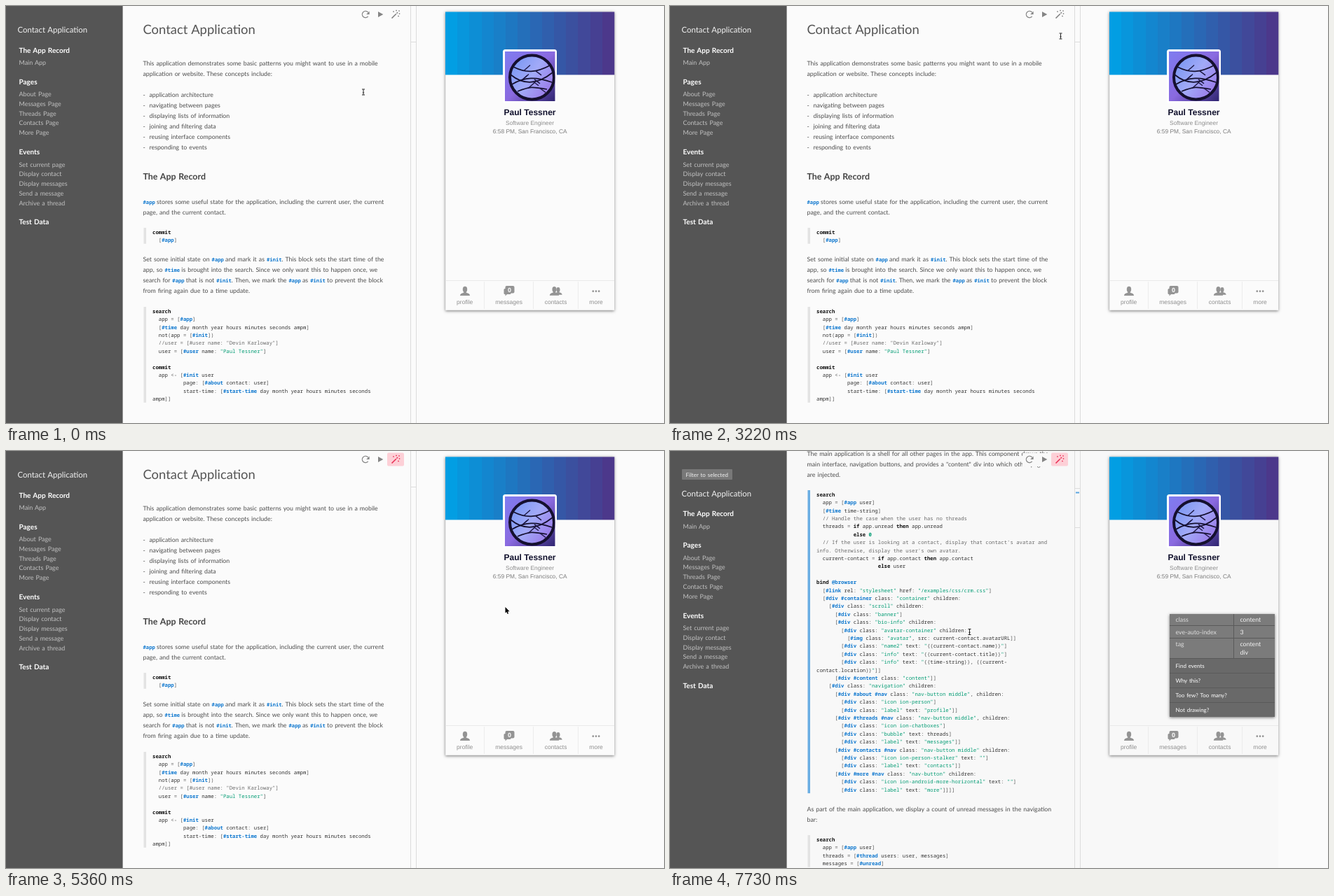
Recreate the animation shown at these times as an HTML page with a canvas. Size 939 by 596 pixels, loop 8000 ms.

```html
<!DOCTYPE html>
<html lang="en">
<head>
<meta charset="utf-8">
<title>Contact Application</title>
<style>
  html, body { margin: 0; width: 100%; height: 100%; overflow: hidden; background: #fbfbfb; }
  canvas { display: block; }
</style>
</head>
<body>
<canvas id="stage" width="939" height="596"></canvas>
<script>
const ctx = document.getElementById('stage').getContext('2d');
const LOOP = 8000;
const SANS = 'Lato, "Open Sans", sans-serif';
const MONO = '"Noto Sans Mono", "DejaVu Sans Mono", monospace';
const ARIAL = '"Liberation Sans", Arial, sans-serif';
const CODE_SIZE = 7.32, CODE_STEP = 11.4, BODY_SIZE = 8.78;
const BLUE = '#0f78cf', GREEN = '#039c74', GRAY = '#949494';
const KEYWORDS = new Set(['search', 'commit', 'bind', 'if', 'then', 'else']);

// Pointer poses, each held until the next: time, x, y, shape
const POSES = [
  [0, 510, 123, 'beam'], [840, 510, 124, 'beam'], [1000, 511, 127, 'beam'], [1160, 515, 133, 'beam'],
  [1320, 847, 287, 'arrow'], [1480, 796.5, 284.5, 'arrow'], [1630, 794, 288, 'arrow'], [1780, 793, 291, 'arrow'],
  [1980, 793, 295, 'arrow'], [2130, 792, 298, 'arrow'], [2270, 788, 296, 'arrow'], [2420, 775, 289, 'arrow'],
  [2570, 752, 278, 'arrow'], [2720, 723, 265, 'arrow'], [2860, 695, 241, 'arrow'],
  [3070, 562, 61, 'beam'], [3220, 557.5, 43, 'beam'], [3370, 557, 36, 'beam'], [3520, 557, 29, 'beam'],
  [3660, 558, 23, 'hand'], [3810, 558, 21.5, 'hand'], [4110, 558, 21.5, 'hand'],
  [4270, 582, 46, 'arrow'], [4430, 640, 130, 'arrow'], [4600, 698, 204, 'arrow'], [4760, 712.5, 223, 'arrow'],
  [5600, 713, 252, 'arrow'], [6040, 713.5, 253, 'arrow'],
  [7230, 668, 256, 'arrow'], [7400, 560, 252, 'beam'], [7560, 478, 253, 'beam'], [7730, 427.5, 258.5, 'beam']
];
const CLOCK_AT = 2420, HOVER_AT = 3660, ACTIVE_AT = 4110, INSPECT_AT = 5600;

const INTRO = [
  [81.5, 'This application demonstrates some basic patterns you might want to use in a mobile'],
  [96.5, 'application or website. These concepts include:'],
  [279.5, '|#app| stores some useful state for the application, including the current user, the current'],
  [294.5, 'page, and the current contact.'],
  [362, 'Set some initial state on |#app| and mark it as |#init|. This block sets the start time of the'],
  [377, 'app, so |#time| is brought into the search. Since we only want this to happen once, we'],
  [392, 'search for |#app| that is not |#init|. Then, we mark the |#app| as |#init| to prevent the block'],
  [407, 'from firing again due to a time update.']
];
const BULLETS = ['application architecture', 'navigating between pages', 'displaying lists of information',
  'joining and filtering data', 'reusing interface components', 'responding to events'];
const SHELL = [
  [3.5, 'The main application is a shell for all other pages in the app. This component draws the'],
  [18.5, 'main interface, navigation buttons, and provides a "content" div into which other pages'],
  [33.5, 'are injected.'],
  [511.5, 'As part of the main application, we display a count of unread messages in the navigation'],
  [526.5, 'bar:']
];
const SIDEBAR = [
  [63, 'The App Record', ['Main App']],
  [108, 'Pages', ['About Page', 'Messages Page', 'Threads Page', 'Contacts Page', 'More Page']],
  [208.5, 'Events', ['Set current page', 'Display contact', 'Display messages', 'Send a message', 'Archive a thread']],
  [308.5, 'Test Data', []]
];

// A leading ~ marks a wrapped comment line
const COMMIT_CODE = `commit
  [#app]`;
const INIT_CODE = `search
  app = [#app]
  [#time day month year hours minutes seconds ampm]
  not(app = [#init])
  //user = [#user name: "Devin Karloway"]
  user = [#user name: "Paul Tessner"]

commit
  app <- [#init user
          page: [#about contact: user]
          start-time: [#start-time day month year hours minutes seconds
ampm]]`;
const SHELL_CODE = `search
  app = [#app user]
  [#time time-string]
  // Handle the case when the user has no threads
  threads = if app.unread then app.unread
            else 0
  // If the user is looking at a contact, display that contact's avatar and
~info. Otherwise, display the user's own avatar.
  current-contact = if app.contact then app.contact
                    else user

bind @browser
  [#link rel: "stylesheet" href: "/examples/css/crm.css"]
  [#div #container class: "container" children:
    [#div class: "scroll" children:
      [#div class: "banner"]
      [#div class: "bio-info" children:
        [#div class: "avatar-container" children:
          [#img class: "avatar", src: current-contact.avatarURL]]
        [#div class: "name2" text: "{{current-contact.name}}"]
        [#div class: "info" text: "{{current-contact.title}}"]
        [#div class: "info" text: "{{time-string}}, {{current-
contact.location}}"]]
      [#div #content class: "content"]]
    [#div class: "navigation" children:
      [#div #about #nav class: "nav-button middle", children:
        [#div class: "icon ion-person"]
        [#div class: "label" text: "profile"]]
      [#div #threads #nav class: "nav-button middle", children:
        [#div class: "icon ion-chatboxes"]
        [#div class: "bubble" text: threads]
        [#div class: "label" text: "messages"]]
      [#div #contacts #nav class: "nav-button middle" children:
        [#div class: "icon ion-person-stalker" text: ""]
        [#div class: "label" text: "contacts"]]
      [#div #more #nav class: "nav-button" children:
        [#div class: "icon ion-android-more-horizontal" text: ""]
        [#div class: "label" text: "more"]]]]`;
const COUNT_CODE = `search
  app = [#app user]
  threads = [#thread users: user, messages]
  messages = [#unread]`;

function rect(x, y, w, h, fill) {
  ctx.fillStyle = fill;
  ctx.fillRect(x, y, w, h);
}

function round(x, y, w, h, r, fill) {
  ctx.fillStyle = fill;
  ctx.beginPath();
  ctx.roundRect(x, y, w, h, r);
  ctx.fill();
}

function shadowed(blur, color, paint) {
  ctx.save();
  ctx.shadowColor = color;
  ctx.shadowBlur = blur;
  ctx.shadowOffsetY = 1;
  paint();
  ctx.restore();
}

function poly(points, fill, stroke, width = 1) {
  ctx.beginPath();
  points.forEach(([x, y]) => ctx.lineTo(x, y));
  ctx.closePath();
  if (stroke) {
    ctx.strokeStyle = stroke;
    ctx.lineWidth = width;
    ctx.stroke();
  }
  ctx.fillStyle = fill;
  ctx.fill();
}

function line(x1, y1, x2, y2, color, width = 1) {
  ctx.strokeStyle = color;
  ctx.lineWidth = width;
  ctx.beginPath();
  ctx.moveTo(x1, y1);
  ctx.lineTo(x2, y2);
  ctx.stroke();
}

function text(str, x, y, font, color, align = 'left') {
  ctx.font = font;
  ctx.textAlign = align;
  ctx.wordSpacing = font.includes('Lato') ? '0.8px' : '0px';
  ctx.fillStyle = color;
  ctx.fillText(str, x, y);
  return ctx.measureText(str).width;
}

const sans = (size, weight = 400) => `${weight} ${size}px ${SANS}`;
const mono = (weight = 400, size = CODE_SIZE) => `${weight} ${size}px ${MONO}`;
const arial = (size, weight = 400) => `${weight} ${size}px ${ARIAL}`;

// Text between bars is set as an inline tag
function prose(lines) {
  for (const [y, str] of lines) {
    let x = 195.5;
    str.split('|').forEach((run, i) => {
      x += i % 2 ? text(run, x, y + 3, mono(700, 7.2), BLUE) : text(run, x, y + 3, sans(BODY_SIZE), '#4c4c4c');
    });
  }
}

function tokenStyle(token) {
  if (token.startsWith('//')) return [400, '#6c6c6c'];
  if (/^[#@]/.test(token)) return [700, BLUE];
  if (KEYWORDS.has(token)) return [700, '#111'];
  if (/^("|\d+$)/.test(token)) return [token === '0' ? 700 : 500, GREEN];
  return [400, /^[\w.-]+$/.test(token) ? '#333' : '#5c5c5c'];
}

function code(source, y, bar) {
  const lines = source.split('\n');
  rect(196.5, y - 6, 3.5, lines.length * CODE_STEP, bar);
  ctx.font = mono();
  const advance = ctx.measureText('0').width;
  lines.forEach((str, row) => {
    const base = y + 2.8 + row * CODE_STEP;
    if (str[0] === '~') {
      text(str.slice(1), 209, base, mono(), '#6c6c6c');
      return;
    }
    for (const match of str.matchAll(/\/\/.*|"[^"{]*"|"|[#@][\w-]+|[\w.-]+|[^\s\w"#@\/]+/g)) {
      const [weight, color] = tokenStyle(match[0]);
      text(match[0], 209 + match.index * advance, base, mono(weight), color);
    }
  });
}

function sidebar(inspect) {
  const dy = inspect ? 26.5 : 0;
  rect(0, 0, 166.6, 596, '#555');
  if (inspect) {
    round(17, 26, 72, 15, 1, '#787878');
    text('Filter to selected', 22.5, 36.5, sans(8), '#f0f0f0');
  }
  text('Contact Application', 16.5, 38 + dy, sans(11.4), '#f2f2f2');
  for (const [y, head, items] of SIDEBAR) {
    text(head, 18.5, y + 3.5 + dy, sans(10, 700), '#fff');
    items.forEach((item, i) => text(item, 18.5, y + 21 + i * 13.8 + dy, sans(8.95), '#c2c2c2'));
  }
}

function editor(inspect) {
  if (inspect) {
    rect(166, 0, 702, 596, '#f8f8f8');
    prose(SHELL);
    code(SHELL_CODE, 62, '#6aaee3');
    code(COUNT_CODE, 555, '#e3e3e3');
    return;
  }
  text('Contact Application', 195.5, 40, sans(18.4), '#555');
  text('The App Record', 195.5, 247.5, sans(12.4, 700), '#444');
  prose(INTRO);
  BULLETS.forEach((item, i) => {
    text('-', 195.5, 129.5 + i * 15, sans(BODY_SIZE), '#4c4c4c');
    text(item, 204.5, 129.5 + i * 15, sans(BODY_SIZE), '#4c4c4c');
  });
  code(COMMIT_CODE, 323, '#e3e3e3');
  code(INIT_CODE, 436, '#e3e3e3');
}

function divider(inspect) {
  line(577.5, 0, 577.5, 596, '#dcdcdc');
  line(585.5, 0, 585.5, 596, '#dcdcdc');
  for (const y of inspect ? [53.5, 109.5] : [51.5]) line(578, y, 585, y, '#dcdcdc');
  if (inspect) line(579, 59.5, 584, 59.5, '#5aa5e0', 2);
}

function toolbar(hover, active, inspect) {
  rect(503, 3, 65, 19, inspect ? '#f8f8f8' : '#fbfbfb');
  if (hover || active) round(544, 2.5, 24, 19, 2, active ? '#fdd0d7' : '#e9e9e9');

  ctx.strokeStyle = '#858585';
  ctx.lineWidth = 1.3;
  ctx.beginPath();
  ctx.arc(513, 12, 4.6, 0.65, 5.6);
  ctx.stroke();
  poly([[518.6, 7.6], [518.6, 12], [514.2, 12]], '#858585');
  poly([[531, 8], [538.3, 12], [531, 16]], '#858585');

  const wand = active ? '#ea2f55' : '#808080';
  line(550.5, 17.5, 556.8, 11.2, wand, 1.6);
  line(557.5, 10.5, 559, 9, wand, 1.6);
  for (const [x, y] of [[553, 8], [557, 6.5], [561, 7], [561.5, 11], [560, 14.5]]) {
    line(x - 1, y, x + 1, y, wand, 0.7);
    line(x, y - 1, x, y + 1, wand, 0.7);
  }
}

function banner() {
  const from = [2, 158, 227], to = [76, 56, 139], bands = 14;
  const edge = i => i === bands ? 868.3 : Math.round(627 + i * 241 / bands);
  for (let i = 0; i < bands; i++) {
    const k = i / (bands - 1);
    const rgb = from.map((c, n) => Math.round(c + (to[n] - c) * k));
    rect(edge(i), 8.4, edge(i + 1) - edge(i), 90, `rgb(${rgb})`);
  }
}

function avatar() {
  round(709, 62, 77, 77, 3.5, '#fff');
  ctx.save();
  ctx.beginPath();
  ctx.rect(712, 65, 71.5, 71);
  ctx.clip();
  const back = ctx.createLinearGradient(712, 65, 784, 136);
  back.addColorStop(0, '#7f7cf0');
  back.addColorStop(0.5, '#8a6ae0');
  back.addColorStop(1, '#2f2470');
  rect(712, 65, 72, 71, back);
  const glass = ctx.createLinearGradient(720, 80, 780, 120);
  glass.addColorStop(0, '#7796f2');
  glass.addColorStop(0.5, '#a2aaf8');
  glass.addColorStop(1, '#9a78e8');
  ctx.fillStyle = glass;
  ctx.strokeStyle = '#15102f';
  ctx.lineWidth = 4;
  ctx.beginPath();
  ctx.arc(750.5, 102, 31.5, 0, 7);
  ctx.fill();
  ctx.stroke();
  ctx.lineWidth = 1.7;
  for (const [x, y, bend, end] of [[724, 87, 9, 778], [720, 98, 15, 780], [722, 112, -11, 779], [730, 122, -7, 772]]) {
    ctx.beginPath();
    ctx.moveTo(x, y);
    ctx.bezierCurveTo(x + 18, y + bend, end - 22, y + bend, end, y - 3);
    ctx.stroke();
    line(x + 15, y + bend * 0.6, x + 24, y + bend * 0.6 - 8, '#1b1540', 1.4);
    line(x + 32, y + bend * 0.65, x + 40, y + bend * 0.65 + 6, '#1b1540', 1.4);
    ctx.strokeStyle = '#15102f';
    ctx.lineWidth = 1.7;
  }
  ctx.restore();
}

function person(x, y, s) {
  ctx.fillStyle = GRAY;
  ctx.beginPath();
  ctx.ellipse(x, y - 2.6 * s, 3.2 * s, 4.2 * s, 0, 0, 7);
  ctx.fill();
  ctx.beginPath();
  ctx.moveTo(x - 7 * s, y + 6.5 * s);
  ctx.quadraticCurveTo(x - 7 * s, y + 3.3 * s, x - 1.8 * s, y + 2.2 * s);
  ctx.lineTo(x - 1.8 * s, y);
  ctx.lineTo(x + 1.8 * s, y);
  ctx.lineTo(x + 1.8 * s, y + 2.2 * s);
  ctx.quadraticCurveTo(x + 7 * s, y + 3.3 * s, x + 7 * s, y + 6.5 * s);
  ctx.fill();
}

function navigation() {
  line(628, 392.5, 868, 392.5, '#e9e9e9');
  for (const x of [682.5, 752.5, 816.5]) line(x, 394, x, 433, '#ececec');
  person(655, 407.5, 1);
  round(710.5, 404, 10, 8, 1.5, GRAY);
  poly([[712.5, 411], [712.5, 414.5], [716, 411]], GRAY);
  round(712.5, 400, 13, 10.5, 2, GRAY);
  text('0', 718.5, 408.7, arial(9, 700), '#fff', 'center');
  person(788, 407.5, 0.8);
  person(782.5, 407.5, 0.95);
  ctx.fillStyle = GRAY;
  for (const x of [837.8, 842, 846.2]) {
    ctx.beginPath();
    ctx.arc(x, 407.7, 1.35, 0, 7);
    ctx.fill();
  }
  [['profile', 654.7], ['messages', 717.6], ['contacts', 784.6], ['more', 842]]
    .forEach(([label, x]) => text(label, x, 425.7, arial(8.5), '#8e8e8e', 'center'));
}

function phone(clock, inspect) {
  const paper = inspect ? '#f8f8f8' : '#fbfbfb';
  shadowed(4, 'rgba(0,0,0,.5)', () => rect(627.2, 8.4, 241, 426.4, paper));
  banner();
  avatar();
  text('Paul Tessner', 747.5, 156, arial(12.05, 700), '#10102c', 'center');
  text('Software Engineer', 747.5, 169.8, arial(8.4), '#8c8c8c', 'center');
  text(`${clock} PM, San Francisco, CA`, 747.7, 182.3, arial(8.4), '#7c7c7c', 'center');
  navigation();
}

function inspector() {
  shadowed(4, 'rgba(0,0,0,.55)', () => rect(713, 233, 150, 147, '#696969'));
  rect(713, 233, 150, 63, '#7b7b7b');
  for (const y of [249.5, 267.5, 296.5, 317.5, 338.5, 359.5]) line(713, y, 863, y, '#5a5a5a');
  line(804.5, 233, 804.5, 296, '#5a5a5a');
  [['class', 241], ['eve-auto-index', 258.5], ['tag', 276]]
    .forEach(([label, y]) => text(label, 721.5, y + 3, sans(8.8), '#dedede'));
  [['content', 241], ['3', 258.5], ['content', 276], ['div', 288]]
    .forEach(([value, y]) => text(value, 813.5, y + 3, sans(8.8), '#f6f6f6'));
  ['Find events', 'Why this?', 'Too few? Too many?', 'Not drawing?']
    .forEach((label, i) => text(label, 721.5, 309.7 + i * 21, sans(8), '#fff'));
}

function pointer(x, y, shape) {
  ctx.save();
  ctx.translate(x, y);
  ctx.lineJoin = 'round';
  if (shape === 'arrow') {
    poly([[0, 0], [0, 8.6], [1.9, 6.9], [3.2, 9.9], [4.6, 9.3], [3.4, 6.4], [6, 6.2]], '#000', '#fff', 1.4);
  } else if (shape === 'beam') {
    line(0, -3.6, 0, 3.6, '#222', 1);
    for (const end of [-4, 4]) line(-2, end, 2, end, '#222', 1);
    line(-1.2, 0.8, 1.2, 0.8, '#222', 0.8);
  } else {
    poly([[-2.5, -4.5], [-1, -4.5], [-0.7, -1], [3, -0.2], [4, 1], [3.4, 3.8], [2.8, 6],
      [-1.8, 6], [-4.4, 1.8], [-3.8, 0.8], [-2.4, 2]], '#fff', '#111', 1.7);
    for (const dx of [-0.4, 1, 2.4]) line(dx, 2.2, dx, 4.5, '#333', 0.6);
  }
  ctx.restore();
}

function draw(t) {
  const inspect = t >= INSPECT_AT;
  const [, x, y, shape] = POSES.findLast(pose => t >= pose[0]);
  ctx.textRendering = 'geometricPrecision';
  rect(0, 0, 939, 596, '#fbfbfb');
  editor(inspect);
  sidebar(inspect);
  divider(inspect);
  toolbar(t >= HOVER_AT, t >= ACTIVE_AT, inspect);
  phone(t >= CLOCK_AT ? '6:59' : '6:58', inspect);
  if (inspect) inspector();
  pointer(x, y, shape);
}

const start = performance.now();
function tick() {
  draw((performance.now() - start) % LOOP);
  requestAnimationFrame(tick);
}
tick();
</script>
</body>
</html>
```
